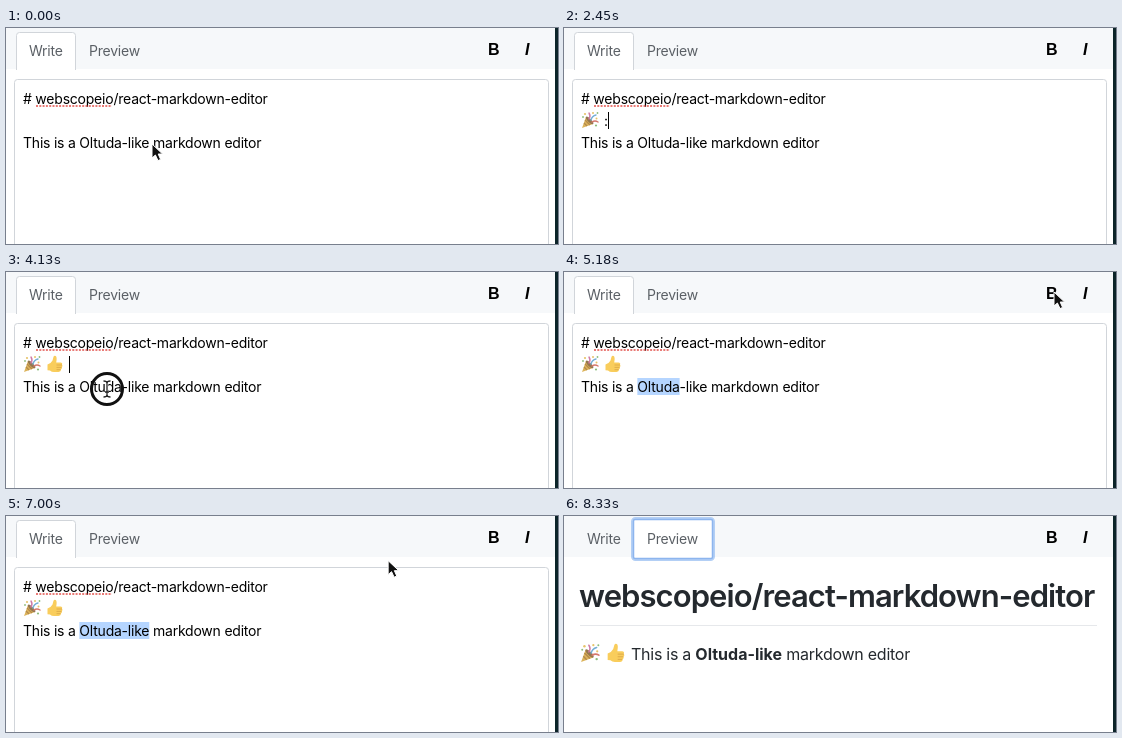
An HTML page that plays this animation: 552 by 216 pixels, repeating every 9170 ms.

```html
<!DOCTYPE html>
<html lang="en">
<head>
<meta charset="utf-8">
<title>Markdown editor</title>
<style>
  html, body { margin: 0; width: 100%; height: 100%; overflow: hidden; background: #fff; }
  svg { display: block; width: 552px; height: 216px; }
  text { font: 14px Inter, sans-serif; font-optical-sizing: none; letter-spacing: -.22px; white-space: pre; }
  .tab { fill: #5b6066; }
  .tool { font: bold 16px "Liberation Sans", Arial, sans-serif; letter-spacing: 0; }
  .italic { font-style: italic; }
  .title { font-size: 31px; font-weight: 600; letter-spacing: -.92px; fill: #24292e; }
  .body { font-size: 16px; letter-spacing: -.26px; fill: #24292e; }
  .body tspan { font-weight: 700; letter-spacing: 0; }
  .box { fill: #fff; stroke: #d1d5da; }
</style>
</head>
<body>
<svg viewBox="0 0 552 216">
  <defs>
    <symbol id="party" viewBox="0 0 18 18">
      <path d="M1 17 5 6Q11 8 12 13Z" fill="#dcb45c"/>
      <path d="M3 12 6 15M4 9 9 14" stroke="#b58a4a" stroke-width="1.3"/>
      <ellipse cx="8.6" cy="9.4" rx="1.8" ry="5" transform="rotate(-45 8.6 9.4)" fill="#94774f"/>
      <g fill="none" stroke-width="1.4" stroke-linecap="round">
        <path d="M8 8Q10 5 8 2" stroke="#cf7ba6"/>
        <path d="M10 9Q11 5 15 4" stroke="#74aed6"/>
        <path d="M11 11Q14 9 17 11" stroke="#d5776c"/>
      </g>
      <g fill="#e6c36a"><circle cx="4" cy="3" r="1.1"/><circle cx="12" cy="2" r="1"/><circle cx="15.5" cy="7.5" r="1"/></g>
      <g fill="#8dbd7c"><circle cx="2" cy="6" r=".9"/><circle cx="15" cy="14.5" r="1.1"/><circle cx="16.5" cy="2" r=".9"/></g>
    </symbol>
    <symbol id="thumb" viewBox="0 0 18 18">
      <path d="M1.5 9.5Q5 8.5 6.5 5.5L7.5 1.8Q8.3 .2 9.7 1Q11.3 2 10.2 7.5H14.5Q16.8 7.8 16 9.7Q17.2 11 15.8 12.3Q16.3 13.8 15 14.6Q15 17 12.5 17H8Q5.5 17 4 15.5L1.5 15.3Z" fill="#f9cd5c"/>
      <path d="M10.5 10H16M10.5 12.4H15.6M10.5 14.7H14.6" stroke="#d9a546" stroke-width=".8"/>
    </symbol>
    <path id="beamShape" d="M-3.5-8Q0-8 0-6Q0-8 3.5-8M0-6V6M-3.5 8Q0 8 0 6Q0 8 3.5 8M-2 3H2"/>
  </defs>

  <rect width="549" height="41" fill="#f6f8fa"/>
  <path id="writeTab" class="box" d="M10.5 42V7.5Q10.5 4.5 13.5 4.5H66.5Q69.5 4.5 69.5 7.5V42"/>
  <g id="focus" fill="#fff">
    <rect x="69" y="3" width="80" height="40" rx="2.5" stroke="#b3cff5" stroke-width="4"/>
    <rect x="69.5" y="3.5" width="79" height="39" rx="1.5" stroke="#8db5ee" stroke-width="1.5"/>
  </g>
  <text class="tab" x="23" y="28">Write</text>
  <text class="tab" x="83" y="28">Preview</text>
  <text class="tool" x="482" y="27">B</text>
  <text class="tool italic" x="519" y="27">I</text>

  <g id="write">
    <rect class="box" x="8.5" y="51.5" width="534" height="190" rx="3"/>
    <rect id="selection" y="106" height="17" fill="#b5d5ff"/>
    <text x="17" y="76"># webscopeio/react-markdown-editor</text>
    <path d="M30 78H106" stroke="#e2504b" stroke-width="1.7" stroke-dasharray="2 1.3"/>
    <use id="emoji1" href="#party" x="17" y="83" width="18" height="18"/>
    <use id="emoji2" href="#thumb" x="40" y="83" width="18" height="18"/>
    <text id="typed" y="98"></text>
    <rect id="caret" y="84" width="1" height="17"/>
    <text id="sentence" x="17" y="120"></text>
  </g>

  <g id="preview">
    <text class="title" x="15" y="91">webscopeio/react-markdown-editor</text>
    <path d="M16 109.5H533" stroke="#e6e8eb"/>
    <use href="#party" x="16" y="127" width="20" height="20"/>
    <use href="#thumb" x="42" y="127" width="20" height="20"/>
    <text class="body" x="67" y="144">This is a <tspan>Oltuda-like</tspan> markdown editor</text>
  </g>

  <g id="pointer">
    <circle id="ring" r="15.5" fill="none" stroke="#111" stroke-width="3"/>
    <path id="arrow" d="M0 0V14L3.4 11 6 16.6 8.6 15.4 6.2 10H10.6Z" fill="#111" stroke="#fff"/>
    <g id="beam" fill="none">
      <use href="#beamShape" stroke="#fff" stroke-width="2.6"/>
      <use href="#beamShape" stroke="#222" stroke-width="1.3"/>
    </g>
  </g>
  <rect x="549" width="3" height="216" fill="#0c2429"/>
</svg>
<script>
const LOOP = 9170, STEP = 70;
const el = id => document.getElementById(id);
const show = (id, on) => el(id).style.display = on ? '' : 'none';
const within = (t, spans) => spans.some(([from, to]) => t >= from && t < to);
const put = (id, attrs) => Object.entries(attrs).forEach(([k, v]) => el(id).setAttribute(k, v));
const setText = (id, value) => { if (el(id).textContent !== value) el(id).textContent = value; };

// time, x, y
const path = [
  [0, 146, 116], [70, 146, 116], [280, 113, 100], [3570, 113, 100], [4060, 101, 117],
  [4270, 101, 117], [4760, 490, 20], [6020, 490, 20], [6160, 273.5, 63.5], [6440, 148, 115],
  [6580, 148, 115], [6790, 74, 115], [6860, 74, 115], [7070, 490, 20], [7400, 490, 20],
  [7600, 105, 20], [8050, 105, 20], [8260, 105, -20], [LOOP, 105, -20]
];
// time, emoji already inserted, text being typed
const typing = [
  [0, 0, ''], [1260, 0, ':'], [1750, 0, ':t'], [1890, 0, ':ta'], [2030, 0, ':tad'],
  [2170, 1, ''], [2450, 1, ':'], [2660, 1, ':+'], [2870, 1, ':+1'], [3220, 2, '']
];
const clicks = [[280, 420], [4130, 4270], [5040, 5180], [7070, 7210], [7700, 7840]];

function pointerAt(t) {
  const i = path.findIndex(p => p[0] > t);
  const [t0, x0, y0] = path[i - 1], [t1, x1, y1] = path[i];
  const u = (t - t0) / (t1 - t0), s = u * u * (3 - 2 * u);
  return [x0 + (x1 - x0) * s, y0 + (y1 - y0) * s];
}

function drawSelection(t, bold, x) {
  const selected = within(t, [[4200, 5740], [6580, 7490]]);
  show('selection', selected);
  if (!selected) return;
  const first = bold ? 12 : 10, last = first + (t < 5740 ? 5 : 10);
  const line = el('sentence');
  const right = line.getEndPositionOfChar(last).x;
  const start = line.getStartPositionOfChar(first).x;
  const left = t >= 6580 && t < 6790 ? Math.min(right, Math.max(start, x)) : start;
  put('selection', { x: left, width: right - left });
}

function draw(t) {
  const [x, y] = pointerAt(t);
  const preview = t >= 7770, bold = t >= 7140;
  show('write', !preview);
  show('writeTab', !preview);
  show('preview', preview);
  show('focus', t >= 7560);

  const [, emoji, text] = typing.findLast(s => s[0] <= t);
  const left = 17 + emoji * 23;
  show('emoji1', emoji > 0);
  show('emoji2', emoji > 1);
  setText('typed', text);
  put('typed', { x: left });
  setText('sentence', `This is a ${bold ? '**Oltuda-like**' : 'Oltuda-like'} markdown editor`);
  if (!preview) {
    const width = text ? el('typed').getComputedTextLength() : 0;
    put('caret', { x: Math.round(left + width) });
    drawSelection(t, bold, x);
  }
  show('caret', within(t, [[350, 910], [1260, 4200]]));

  const arrow = t < 140 || y < 50;
  show('pointer', within(t, [[0, 1260], [3570, 8260]]));
  put('pointer', { transform: `translate(${x} ${y})` });
  show('arrow', arrow);
  show('beam', !arrow);
  show('ring', within(t, clicks));
}

const begin = performance.now();
function tick() {
  const t = (performance.now() - begin) % LOOP;
  draw(Math.floor(t / STEP) * STEP);
  requestAnimationFrame(tick);
}
tick();
</script>
</body>
</html>
```
